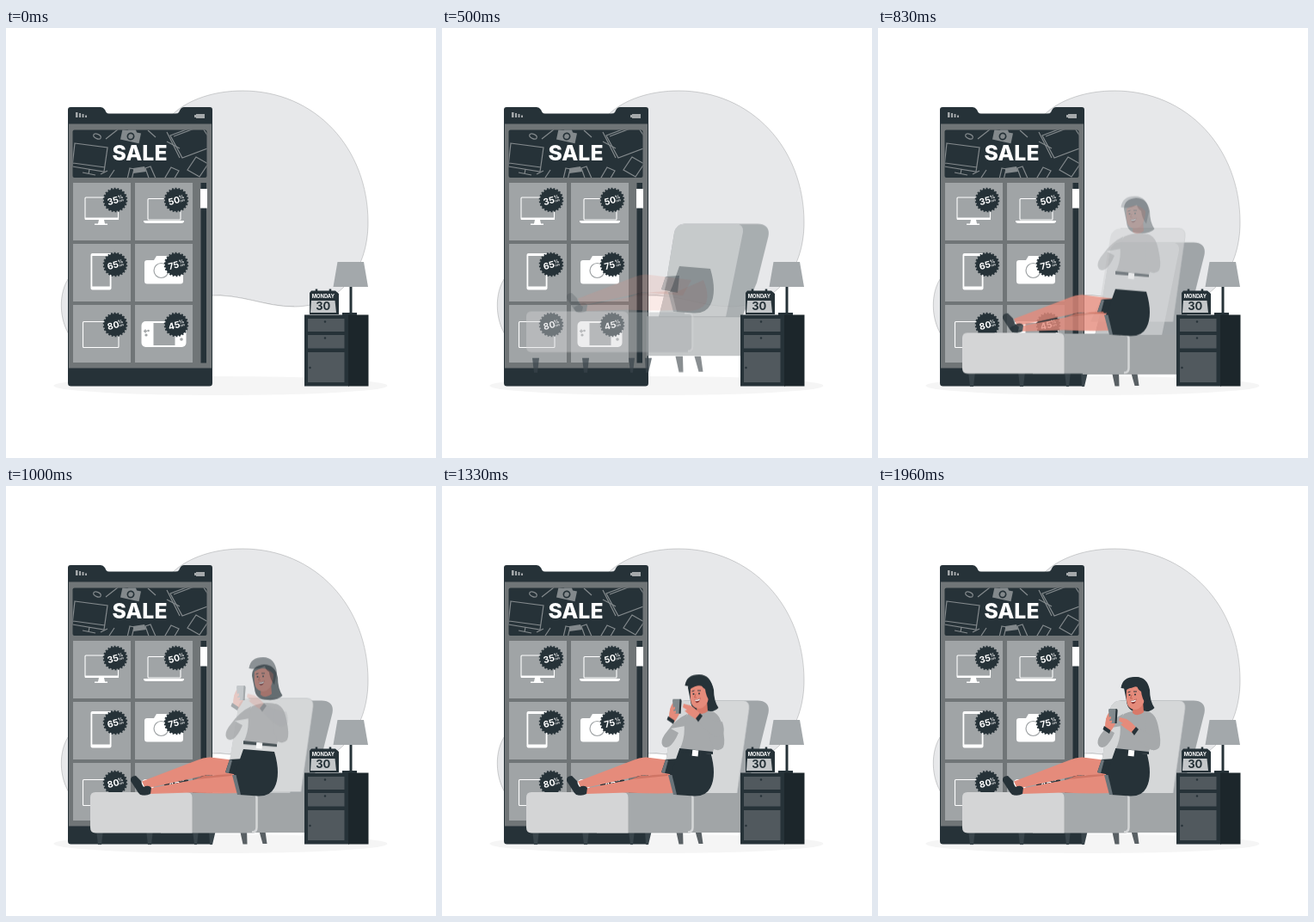
These frames come from a looping animation (500x500 px, 2000 ms). An HTML page:

```html
<!DOCTYPE html>
<html lang="en">
<head>
<meta charset="utf-8">
<title>Sale</title>
<style>
html, body { margin: 0; width: 100%; height: 100%; overflow: hidden; background: #fff; }
svg { display: block; width: 100vw; height: 100vh; }
text { font-family: Inter, "Open Sans", sans-serif; font-weight: 700; }
.dark { fill: #263238; }
.skin { fill: #e58b7b; }
.wool { fill: #a6a9ab; }
.line { fill: none; stroke: #fff; stroke-width: 1.1; }
.deco { fill: none; stroke: #83898c; stroke-width: 1.2; }

/* Every layer drops into place while it fades in. */
.feet, .chair, .seat, .pillow, .front, .shorts, .legs, .hair, .torso, .face, .fringe, .left, .right {
  animation-duration: 2s;
  animation-iteration-count: infinite;
  animation-timing-function: cubic-bezier(.65, 0, .45, 1), linear;
}
.feet { animation-name: feet-drop, feet-fade; }
.chair { animation-name: chair-drop, chair-fade; }
.seat { animation-name: chair-drop, seat-fade; }
.pillow { animation-name: pillow-drop, pillow-fade; }
.front { animation-name: front-drop, front-fade; }
.shorts { animation-name: shorts-drop, shorts-fade; }
.legs { animation-name: legs-drop, legs-fade; }
.torso { animation-name: torso-drop, torso-fade; }
.hair { animation-name: hair-drop, hair-fade; }
.face { animation-name: face-drop, face-fade; }
.fringe { animation-name: fringe-drop, fringe-fade; }
.left { animation-name: left-drop, left-fade; }
.right { animation-name: right-drop, right-fade; }

@keyframes feet-drop { 0%, 10.5% { transform: translateY(-30px) } 38.5%, 100% { transform: none } }
@keyframes feet-fade { 0%, 10.5% { opacity: 0 } 31%, 100% { opacity: 1 } }
@keyframes chair-drop { 0%, 10.5% { transform: translateY(-30px) } 44%, 100% { transform: none } }
@keyframes chair-fade { 0%, 10.5% { opacity: 0 } 27%, 100% { opacity: 1 } }
@keyframes seat-fade { 0%, 10.5% { opacity: 0 } 34%, 100% { opacity: 1 } }
@keyframes pillow-drop { 0%, 25% { transform: translateY(-28px) } 58%, 100% { transform: none } }
@keyframes pillow-fade { 0%, 25% { opacity: 0 } 50%, 100% { opacity: 1 } }
@keyframes front-drop { 0%, 14.5% { transform: translateY(-30px) } 48%, 100% { transform: none } }
@keyframes front-fade { 0%, 14.5% { opacity: 0 } 39.6%, 100% { opacity: 1 } }
@keyframes shorts-drop { 0%, 15.5% { transform: translateY(-32px) } 49%, 100% { transform: none } }
@keyframes shorts-fade { 0%, 15.5% { opacity: 0 } 41%, 100% { opacity: 1 } }
@keyframes legs-drop { 0%, 18.5% { transform: translateY(-30px) } 52%, 100% { transform: none } }
@keyframes legs-fade { 0%, 20% { opacity: 0 } 47%, 100% { opacity: 1 } }
@keyframes torso-drop { 0%, 27% { transform: translateY(-28px) } 64.5%, 100% { transform: none } }
@keyframes torso-fade { 0%, 27% { opacity: 0 } 55%, 100% { opacity: 1 } }
@keyframes hair-drop { 0%, 28% { transform: translateY(-28px) } 69.5%, 100% { transform: none } }
@keyframes hair-fade { 0%, 31.5% { opacity: 0 } 59%, 100% { opacity: 1 } }
@keyframes face-drop { 0%, 33.5% { transform: translateY(-28px) } 73.5%, 100% { transform: none } }
@keyframes face-fade { 0%, 33.5% { opacity: 0 } 63.5%, 100% { opacity: 1 } }
@keyframes fringe-drop { 0%, 35.5% { transform: translateY(-27px) } 77%, 100% { transform: none } }
@keyframes fringe-fade { 0%, 35.5% { opacity: 0 } 66%, 100% { opacity: 1 } }
@keyframes left-drop { 0%, 41.5% { transform: translateY(-28px) } 85%, 100% { transform: none } }
@keyframes left-fade { 0%, 41.5% { opacity: 0 } 66%, 100% { opacity: 1 } }
@keyframes right-drop { 0%, 44% { transform: translateY(-28px) } 88%, 100% { transform: none } }
@keyframes right-fade { 0%, 44% { opacity: 0 } 66.5%, 100% { opacity: 1 } }
</style>
</head>
<body>
<svg viewBox="0 0 500 500">
  <defs>
    <g id="badge">
      <circle r="13" class="dark"/>
      <circle r="13.3" fill="none" stroke="#263238" stroke-width="2" pathLength="44" stroke-dasharray="1 1"/>
      <g fill="#fff">
        <text x="3.6" y="0" font-size="6">%</text>
        <text x="4" y="3.6" font-size="3">OFF</text>
      </g>
    </g>
    <rect id="cell" width="67" height="67" fill="#a0a4a6"/>
    <clipPath id="banner"><rect x="77.500" y="118.500" width="156" height="55.500" rx="2"/></clipPath>
  </defs>

  <!-- Backdrop -->
  <path d="M76 287C62 302 60 334 73 356L235 400V311C275 309 300 324 335 324C385 324 421 285 421 226C421 140 360 73 275 73C244 73 212 82 192 102Z"
    fill="#e7e8ea" stroke="#9ea1a3" stroke-width=".5"/>
  <path d="M235 311C275 309 300 324 335 324L330 402H235Z" fill="#fff"/>
  <path d="M235 311C275 309 300 324 335 324" fill="none" stroke="#9ea1a3" stroke-width=".5"/>
  <ellipse cx="249.500" cy="416" rx="194" ry="11" fill="#f5f5f5"/>

  <!-- Phone -->
  <path class="dark" d="M75 92H110Q113 92 115 95L116.500 98Q117.500 99.500 120 99.500H197Q200 99.500 201 98L202.500 95Q204 92 207 92H237Q240 92 240 95V413Q240 416.500 236.500 416.500H75.500Q72 416.500 72 413V95Q72 92 75 92Z"/>
  <rect x="73" y="111.500" width="166" height="284" fill="#707577"/>
  <g fill="#a5a9ab">
    <path d="M81 98h2.500v6H81zM85 99h2v5h-2zM88.500 100h2v4h-2zM92 101.500h2v2.500h-2z"/>
    <path d="M219 101h2v-1h10v5h-10v-1h-2z"/>
  </g>
  <rect class="dark" x="77.500" y="118.500" width="156" height="55.500" rx="2"/>
  <g clip-path="url(#banner)">
    <g class="deco">
      <path d="M80 134L118 139L114 167L77 161ZM97 164L96 170M89 168L104 171M78 157L115 162"/>
      <path d="M191 125L226 112L242 137L205 151ZM195 126L224 115M205 151L242 137M187 121L202 151"/>
      <path d="M162 163L168 161L175 177L168 180ZM144 163L149 164L145 181L140 180Z"/>
      <path d="M116 129L130 118M202 140L187 132M126 165L120 174"/>
      <path d="M221 150L235 158L225 173L211 165ZM192 162L201 166L194 178L185 174Z"/>
      <path d="M110 170L118 166M165 119L174 127"/>
      <ellipse cx="106" cy="126" rx="4.500" ry="2.600" transform="rotate(25 106 126)"/>
    </g>
    <g fill="#83898c" transform="rotate(12 145 126)">
      <path d="M134 120H140L142 117H149L151 120H156V132H134Z"/>
      <circle cx="145" cy="126" r="4.500" fill="#263238"/><circle cx="145" cy="126" r="2.800"/>
    </g>
    <path d="M148 163L161 161L163 167L148 169Z" fill="#83898c"/>
  </g>
  <text x="155.500" y="154" font-size="24.800" font-weight="800" style="font-weight:800" fill="#fff" text-anchor="middle">SALE</text>

  <use href="#cell" x="78" y="180"/><use href="#cell" x="150" y="180"/>
  <use href="#cell" x="78" y="251"/><use href="#cell" x="150" y="251"/>
  <use href="#cell" x="78" y="322"/><use href="#cell" x="150" y="322"/>
  <rect class="dark" x="226.500" y="180" width="6.500" height="209.500"/>
  <rect x="226" y="187" width="8" height="22.500" fill="#fff"/>

  <!-- Devices -->
  <g class="line">
    <rect x="92" y="197" width="38.500" height="25.500" rx="1"/>
    <rect x="165" y="198.500" width="38" height="24.500" rx="1"/>
    <rect x="89.500" y="341.500" width="41.500" height="30" rx="1"/>
  </g>
  <g fill="#fff">
    <path d="M92 220.500H131V223H92ZM108 223H114L115 227.500H118V229H103V227.500H107Z"/>
    <path d="M160 224H207V225.500Q206 227 203 227H164Q161 227 160 225.500Z"/>
    <rect x="98.500" y="262" width="24" height="42.500" rx="2"/>
    <path d="M164 270H172L175 265H188L191 270H203Q206 270 206 273V294Q206 297.500 203 297.500H164Q161 297.500 161 294V273Q161 270 164 270Z"/>
    <rect x="157.500" y="341" width="52" height="30" rx="5"/>
  </g>
  <rect x="100.300" y="265" width="20.400" height="35.500" fill="#a0a4a6"/>
  <circle cx="180.500" cy="282" r="8.500" fill="none" stroke="#a0a4a6" stroke-width="1.200"/>
  <rect x="171.500" y="343" width="25" height="26" fill="#a0a4a6"/>
  <path d="M162 350.500v4M160 352.500h4" stroke="#a0a4a6" stroke-width="1.500"/>
  <g fill="#a0a4a6"><circle cx="165.500" cy="352" r="1.300"/><circle cx="163" cy="357" r="1.600"/><circle cx="204" cy="362" r="1.800"/></g>

  <!-- Badges -->
  <g font-size="10.500" fill="#fff">
    <g transform="translate(127 200) rotate(-14)"><use href="#badge"/><text x="-9.500" y="4">35</text></g>
    <g transform="translate(198 200) rotate(-14)"><use href="#badge"/><text x="-9.500" y="4">50</text></g>
    <g transform="translate(127 275) rotate(-14)"><use href="#badge"/><text x="-9.500" y="4">65</text></g>
    <g transform="translate(198 275) rotate(-14)"><use href="#badge"/><text x="-9.500" y="4">75</text></g>
    <g transform="translate(127 345) rotate(-14)"><use href="#badge"/><text x="-9.500" y="4">80</text></g>
    <g transform="translate(198 345) rotate(-14)"><use href="#badge"/><text x="-9.500" y="4">45</text></g>
  </g>

  <!-- Armchair -->
  <g class="feet">
    <path d="M271.500 398H280L280.500 416.500H275.500ZM293.500 398H301L303.500 416H298.500Z" fill="#596064"/>
    <path d="M105 400H113L111 417H107ZM163 400H171L169 417H165ZM217 400H224L222 417H219ZM236 400H244L240 417H237Z" fill="#39454b"/>
  </g>
  <g class="chair">
    <path d="M282 249.500H367Q382 250 379.500 264L366 318L349 358H252L258 334L270 260Q272 250 282 249.500Z" fill="#a0a5a8"/>
    <path d="M282 249.500H342Q351 250 350 259L330 358H252L258 334L270 260Q272 250 282 249.500Z" fill="#c2c5c7"/>
  </g>
  <g class="pillow">
    <path d="M282 249.500H350Q358 250 357 259L343 358H247L258 334L270 260Q272 250 282 249.500Z" fill="#d5d7d8"/>
    <path d="M282 249.500H350Q358 250 357 259L343 358" fill="none" stroke="#bfc2c4" stroke-width=".7"/>
  </g>
  <rect class="seat" x="238" y="357" width="111" height="46" fill="#a1a5a7"/>

  <!-- Footrest -->
  <g class="front">
    <path d="M180 357H288Q292.500 357 292.500 362V398Q292.500 403.500 287 403.500H180Z" fill="#a5a9ab"/>
    <path d="M282 358H287Q291.500 358 291.500 363V397Q291.500 402.500 286 402.500" fill="none" stroke="#d5d7d8" stroke-width="2.500"/>
    <path d="M104 356H210Q216.500 356 216.500 362V403.500H104Q98 403.500 98 397V362Q98 356 104 356Z" fill="#d4d5d6"/>
  </g>

  <!-- Lamp, calendar and cabinet -->
  <path d="M399.500 300H402.500V331H408V334H391V331H399.500Z" class="dark"/>
  <path d="M385.500 272H416L421 301H380.500Z" fill="#a3a8ab"/>
  <path d="M355 305.500H383L387 309V333H353V308Z" class="dark"/>
  <path d="M355 317H382.500L384 331H354Z" fill="#c4c7c9"/>
  <path d="M361 303.500v5M377 303.500v5" stroke="#263238" stroke-width="2.500"/>
  <text x="368.800" y="313.500" font-size="5.800" fill="#fff" text-anchor="middle">MONDAY</text>
  <text x="368.800" y="328" font-size="13" class="dark" text-anchor="middle">30</text>
  <rect class="dark" x="347" y="333.500" width="52" height="83"/>
  <rect x="398" y="333.500" width="23.500" height="83" fill="#1c262b"/>
  <g fill="#51595e">
    <rect x="351" y="338" width="42.500" height="15"/>
    <rect x="351" y="357" width="42.500" height="15.500"/>
    <rect x="351" y="377" width="42.500" height="35"/>
  </g>
  <g class="dark"><circle cx="371" cy="341.500" r="1.200"/><circle cx="371" cy="360.500" r="1.200"/><circle cx="353.500" cy="395" r="1.200"/></g>

  <!-- Shopper -->
  <g class="legs">
    <path class="skin" d="M290 322L238 315.500Q230 315 222 319L158 343.500L162 352L235 336L280 340Z"/>
    <path class="dark" d="M151 337Q144 337 145 343L154 357Q158 361 163 358L164 353Q158 350 157 343Z"/>
  </g>
  <g class="shorts">
    <path class="dark" d="M255 333L260 318L276 317L274 337Z"/>
    <path d="M255 333L260 318L263 319L259 334Z" fill="#69747a"/>
  </g>
  <g class="legs">
    <path d="M230 337L262 335L264 340L218 342Z" fill="#cf7565"/>
    <path class="skin" d="M272 336L222 341L163 352.500L167 358L215 356.500Q247 358 273 357Q298 361 307 349Q311 338 304 322Z"/>
    <path class="dark" d="M160 350Q166 347 169 351L168 358Q163 361 156 359L153 354Z"/>
  </g>
  <g class="shorts">
    <path class="dark" d="M276 306L312 309Q320 336 312 351Q307 361 293 360.500L271 359L265 336L268 329Z"/>
    <path d="M263 336L267.500 336L273 359L269 359Z" fill="#69747a"/>
  </g>
  <path class="hair dark" d="M286 235Q286 223 300 222Q313 222 316 237Q316 250 321.500 258Q316 264 304 263Q290 263 289 250Z"/>
  <g class="torso">
    <path class="wool" d="M286 265Q302 258 316 263Q326 268 323 285L314 312L276 307Q284 291 281 273Z"/>
    <path class="dark" d="M276 305L315 309V312L276 309Z"/>
    <rect x="291" y="307" width="7" height="7" fill="#fff" transform="rotate(6 294 310)"/>
    <path class="wool" d="M285 265Q272 271 262 285Q255 293 255.500 299Q257 306 264 303Q270 299 275 287L266 282L283 279Z"/>
    <path class="wool" d="M313 262Q323 264 326 280Q330 298 327 304Q323 309 316 306L310 290Z"/>
  </g>
  <g class="face">
    <path d="M297 252L308 250L309 263Q302 269 296 264Z" fill="#d87969"/>
    <path class="skin" d="M289 237Q288 252 291 256Q296 262 303 259Q311 254 311 240Q301 228 289 237Z"/>
    <g class="dark"><circle cx="292.500" cy="243" r="1"/><circle cx="299" cy="242.500" r="1"/></g>
    <path d="M290.500 240l3 -1M297 239l4 0" stroke="#263238" stroke-width=".9"/>
    <path d="M295 243L293.500 247H296" fill="none" stroke="#b9584a" stroke-width=".8"/>
    <path d="M293.500 249.500Q297 250 300.500 247.500Q299.500 254 295.500 253Z" fill="#862f2d"/>
    <path d="M294 249.700Q297 250 300 248.200L299.500 250.200Q297 251.500 294.500 251Z" fill="#fff"/>
  </g>
  <path class="fringe dark" d="M282.500 235Q284 222 299 222Q313 222 315 240L312 254Q307 248 306 239Q302 237 301 232Q293 237 283 235Z"/>
  <g class="left">
    <path class="skin" d="M264 281Q264 270 268 264L274 263L278 271Q276 278 270 286Z"/>
    <path d="M263 279L270.500 284L269 288L261.500 283Z" class="dark"/>
    <path d="M269 259H277Q278.500 259 278.500 261L277.500 276H269.500L268 261Q268 259 269 259Z" fill="#818a8e"/>
    <path d="M276.500 259Q278.500 259 278.500 261L277.500 276H275.500Z" class="dark"/>
    <path class="skin" d="M265 270L271 268V270.500L267 273ZM266 274L272 272.500V275L268 277Z"/>
  </g>
  <g class="right">
    <path class="wool" d="M326 290Q329 299 327 304Q323 309 316 306Q305 299 297 288L302 282L315 288Z"/>
    <path class="skin" d="M281 269L289 271Q296 275 301 282L297 288Q287 282 282 277L285 276L280 273Z"/>
    <path class="dark" d="M300 280L303 283L298 290L295 286Z"/>
  </g>
</svg>
</body>
</html>
```
